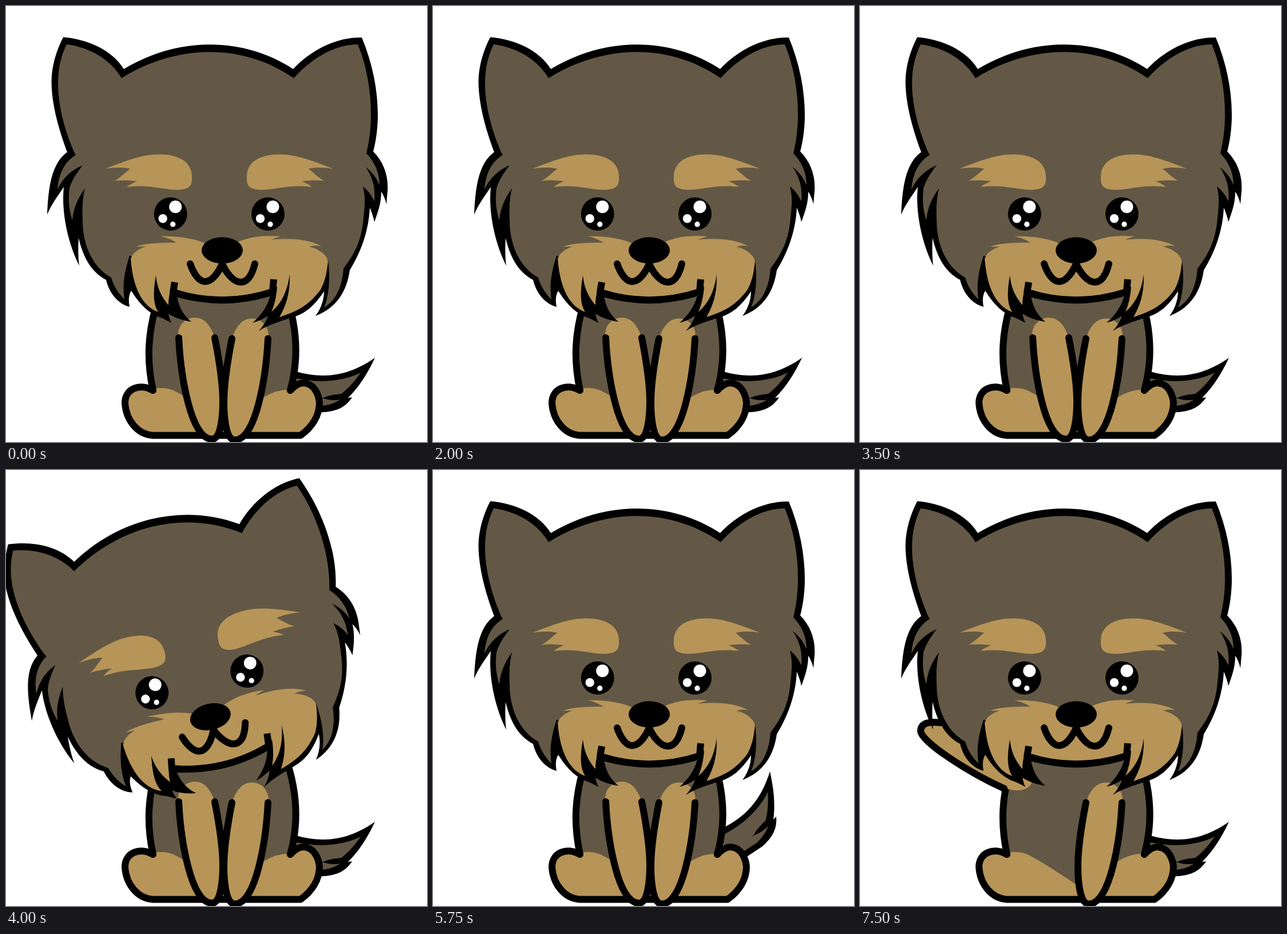
Recreate the animation shown at these times as an HTML page. Size 736 px wide and 761 px high, loop 7.75 s.

```html
<!DOCTYPE html>
<html lang="en">
<head>
<meta charset="utf-8">
<title>Puppy</title>
<style>
html, body { margin: 0; width: 100%; height: 100%; overflow: hidden; background: #fff; }
svg { display: block; width: 100vw; height: 100vh; }
.brown { fill: #635845; }
.tan { fill: #b79457; }
.line { fill: none; stroke: #000; stroke-width: 12; stroke-linecap: round; stroke-linejoin: round; }
.butt { stroke-linecap: butt; }
.light { fill: #fff; }
</style>
</head>
<body>
<svg viewBox="0 0 736 761">
  <defs>
    <g id="leg">
      <path class="tan" d="M301 579C299 556 315 544 330 544C350 544 359 562 365 579C370 605 379 650 379 690C379 715 376 754 361 756C322 758 305 640 302 579Z"/>
      <path class="line" d="M302 579C305 640 322 758 361 756C376 754 379 715 379 690C379 650 370 605 365 579"/>
    </g>
    <path id="brow" class="tan" d="M174 284C215 268 240 259 268 259C302 259 325 272 325 298C326 315 320 320 300 321C270 320 250 311 211 316C217 311 223 308 229 306C215 304 202 304 190 305C200 300 208 291 217 284C202 281 188 282 174 284Z"/>
    <g id="eye">
      <circle r="29"/>
      <circle class="light" cx="8.5" cy="-12.5" r="11"/>
      <circle class="light" cx="-13.5" cy="8" r="7.7"/>
      <circle class="light" cx="4" cy="18" r="4.7"/>
    </g>
  </defs>

  <g id="tail">
    <path d="M500 636C560 655 605 642 645 614C632 641 619 663 598 684L605 683C593 702 575 708 553 709L515 706Z"/>
    <path class="brown" d="M500 648C545 660 590 655 620 640C608 657 598 668 586 677C574 678 563 680 555 684L505 690Z"/>
    <path class="brown" d="M505 682L555 685C565 688 575 689 584 687C574 694 562 697 550 698L515 695Z"/>
  </g>

  <path class="brown" d="M275 470C246 570 246 620 257 671L262 735H500L497 671C510 625 512 570 488 490L470 470Z"/>
  <path class="tan" d="M257 670C235 660 208 665 208 693C210 725 232 749 258 749.5H515C535 735 548 715 548 692C545 665 520 645 497 670C475 669 458 677 440 690L380 725C350 705 325 688 297 673C288 668 275 665 257 668Z"/>
  <path class="line" d="M268 505C246 570 246 620 257 671C235 658 208 667 208 693C210 725 232 749 258 749.5H515C535 735 548 715 548 692C545 662 520 645 497 671C510 625 512 570 490 505"/>

  <use id="paw" href="#leg"/>
  <use href="#leg" transform="matrix(-1 0 0 1 760 1.5)"/>
  <g id="wave">
    <path class="tan" d="M252 556C190 528 108 475 106 456C108 438 130 438 150 446C200 470 250 490 294 505C310 528 308 562 270 559Z"/>
    <path class="line" d="M252 556C190 528 108 475 106 456C106 440 124 439 140 441"/>
  </g>

  <g id="head">
    <path d="M107 255C92 215 80 172 79.5 133C79.5 105 88 78 100 54.5C145 58 186 78 206 110C300 53 415 53 502 110C535 75 580 54 622 55C640 98 650 145 650 190C650 213 647 235 642 254C660 272 669 296 667 323L665 346C663 337 660 330 656 324C656 345 650 360 644 377C642 367 639 359 636 352C634 395 619 432 601 461C596 496 580 526 541 541C551 528 556 512 556 498C540 522 525 536 502 543C480 550 460 556 442 567C450 558 455 550 458 541C450 546 442 550 431 553C448 538 458 522 462 505Q380 533 299 506C302 525 310 540 324 551C310 549 296 545 284 537C285 543 287 548 289 553C280 548 272 544 265 542C245 533 230 515 219 497C214 505 214 515 216 525C195 520 180 500 175 478C150 465 135 440 127 405C126 420 126 440 128 453C111 420 96 365 101 316C91 331 80 345 72 364C74 318 79 275 107 255Z"/>
    <path class="brown" d="M119 255C100 210 91 170 91 134C91 108 97 85 106 67C145 72 182 92 202 126C300 65 415 65 503 126C537 88 578 67 615 67C631 105 638 150 638 188C638 215 635 236 630 257C645 273 653 291 653 313C648 300 640 290 629 281C641 300 646 316 644 341C639 330 633 322 624 315C629 335 627 350 625 370C622 410 608 435 590 458C588 490 576 515 556 526C565 505 567 475 563 443L380 460L216 436C205 470 204 490 207 512C195 500 188 488 184 474C150 455 134 415 134 375C133 352 134 335 138 318C125 337 118 352 116 374C109 352 109 335 111 318C116 302 124 291 134 278C113 287 100 300 90 320C92 293 102 272 122 260Z"/>
    <path class="tan" d="M218 441C222 430 232 424 244 420L227 420C248 413 275 413 298 413C290 408 281 404 270 402C300 401 330 406 350 415L405 412C430 401 455 400 480 402C473 404 468 406 463 408C500 404 530 408 551 419C543 418 537 418 530 420C550 425 560 435 563 445C561 465 558 480 550 495C530 522 510 533 478 543C488 525 497 505 496 468C492 500 480 520 464 534C470 520 473 505 474 490L462 494Q380 521 298 495L289 489C285 505 284 513 284 522C272 508 264 492 262 470C257 500 257 520 266 534C240 525 222 495 218 441Z"/>
    <path class="line butt" d="M295 482L292 500Q380 527 466 499L468 477"/>
    <use href="#brow"/>
    <use href="#brow" transform="matrix(-1 0 0 1 746 0)"/>
    <use href="#eye" x="287.7" y="363"/>
    <use href="#eye" x="458" y="363"/>
    <ellipse cx="378" cy="426.5" rx="36" ry="23"/>
    <path class="line" d="M322 450C328 468 338 481 348 481C360 481 371 466 378 450C385 466 398 482 410 482C424 482 431 466 435 450"/>
  </g>
</svg>
<script>
const STEP = 250, STEPS = 31;
const TAIL_UP = 'matrix(.788 -.616 .616 .788 -297.5 439.5)';
const LEFT = -12.85, RIGHT = 16;
const [tail, paw, wave, head] = ['tail', 'paw', 'wave', 'head'].map(id => document.getElementById(id));

// Two tail wags, then one tilt: left, left, right.
function tilt(beat) {
  if (beat % 6 !== 4 || beat < 10 || beat > 22) return 0;
  return beat < 22 ? LEFT : RIGHT;
}

function draw(ms) {
  const beat = Math.floor(ms / STEP) % STEPS;
  const up = beat % 2 === 1;
  const waving = !up && beat >= 26;
  tail.setAttribute('transform', up ? TAIL_UP : '');
  head.setAttribute('transform', `rotate(${tilt(beat)} 386.3 520)`);
  paw.setAttribute('visibility', waving ? 'hidden' : 'visible');
  wave.setAttribute('visibility', waving ? 'visible' : 'hidden');
}

const start = performance.now();
function tick() {
  draw(performance.now() - start);
  requestAnimationFrame(tick);
}
draw(0);
requestAnimationFrame(tick);
</script>
</body>
</html>
```
